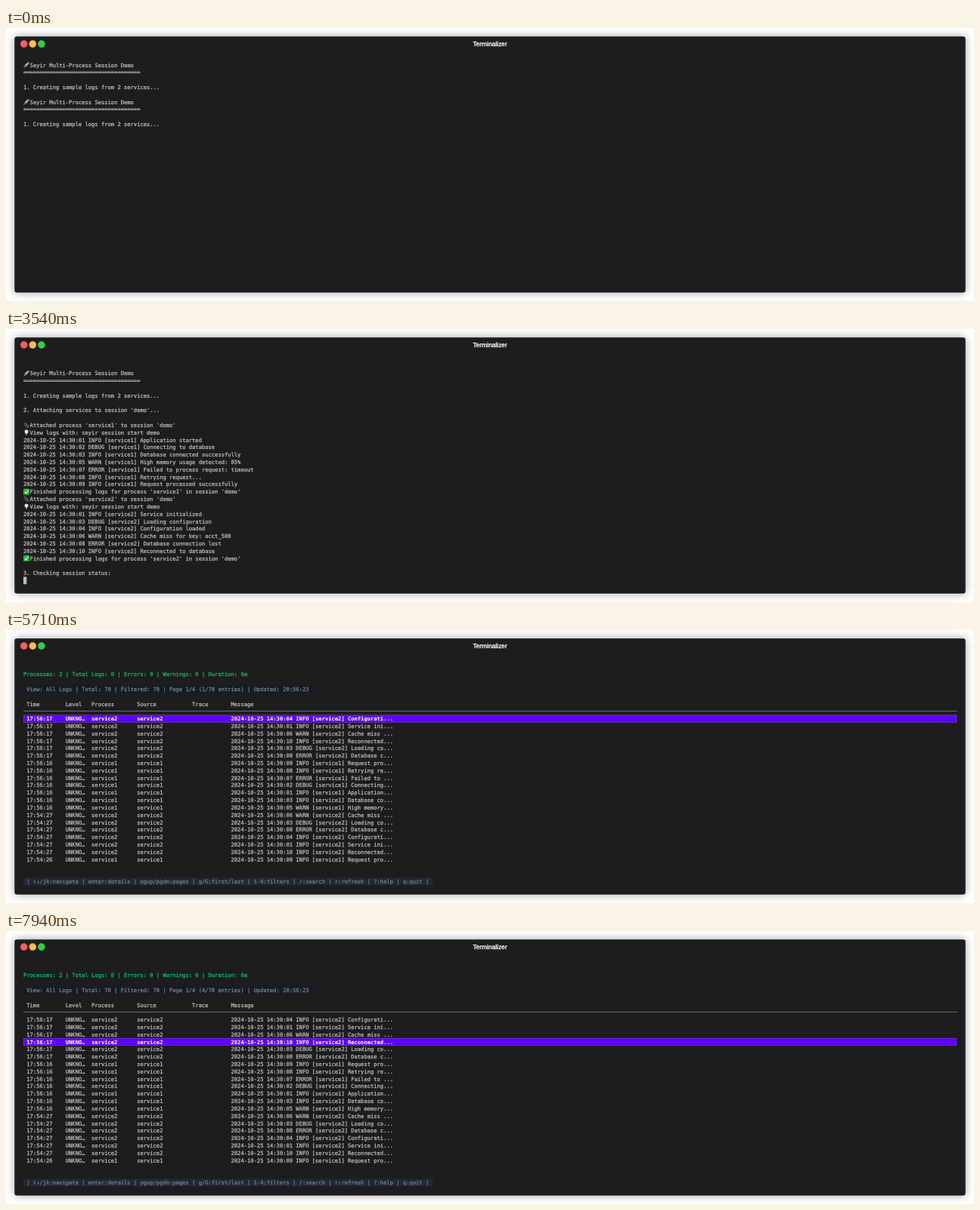
An HTML page with a canvas for the animation above (8 s loop, 1280x362 px).

```html
<!DOCTYPE html>
<html lang="en">
<head>
<meta charset="utf-8">
<title>Terminal session</title>
<style>
  html, body { margin: 0; width: 100%; height: 100%; overflow: hidden; background: #fff; }
  canvas { display: block; }
</style>
</head>
<body>
<canvas id="stage" width="1280" height="362"></canvas>
<script>
const ctx = document.getElementById('stage').getContext('2d');
const LOOP = 8000, ROWS = 30, COLS = 287;
const LEFT = 23, TOP = 44.1, CELL = 4.3, LINE = 9.81;
const BG = '#1d1d1d', FG = '#bcbcbc';
const MONO = '7.145px "DejaVu Sans Mono", monospace';

const stamp = (service, entries) => entries.map(entry =>
  `2024-10-25 14:30:${entry.replace(/^(\d+ \w+)/, `$1 [${service}]`)}`);

const logs = {
  service1: stamp('service1', [
    '01 INFO Application started',
    '02 DEBUG Connecting to database',
    '03 INFO Database connected successfully',
    '05 WARN High memory usage detected: 85%',
    '07 ERROR Failed to process request: timeout',
    '08 INFO Retrying request...',
    '09 INFO Request processed successfully',
  ]),
  service2: stamp('service2', [
    '01 INFO Service initialized',
    '03 DEBUG Loading configuration',
    '04 INFO Configuration loaded',
    '06 WARN Cache miss for key: acct_508',
    '08 ERROR Database connection lost',
    '10 INFO Reconnected to database',
  ]),
};

// Places each text at its column.
const columns = (stops, texts) =>
  texts.reduce((line, text, i) => line.padEnd(stops[i]) + text, '');

const intro = ['🚀Seyir Multi-Process Session Demo', '='.repeat(36), '',
  '1. Creating sample logs from 2 services...', ''];

const attach = name => [
  `📎Attached process '${name}' to session 'demo'`,
  '💡View logs with: seyir session start demo',
  ...logs[name],
  `✅Finished processing logs for process '${name}' in session 'demo'`,
];

const session = (...cells) => columns([0, 21, 34, 45, 54, 65], cells);

const transcript = [
  ...intro, ...intro,
  "2. Attaching services to session 'demo'...", '',
  ...attach('service1'), ...attach('service2'),
  '',
  '3. Checking session status:',
  'Active Sessions (4):',
  '',
  columns([0, 21, 34, 45, 55, 66], ['NAME', 'ID', 'DURATION', 'PROCESSES', 'LOGS', 'LAST UPDATE']),
  '-'.repeat(80),
  session('ecommerce-app', 'sess_059...', '12m', '3', '0', '20:46:30'),
  session('test-session', 'sess_26b...', '28m', '2', '0', '20:34:43'),
  session('demo', 'sess_912...', '6m', '2', '0', '20:54:34'),
  session('carbmee', 'sess_e91...', '59m', '1', '0', '20:23:34'),
  '',
  "Use 'seyir session start <name>' to view a session's logs in TUI.",
  '',
  '4. Opening TUI to view aggregated logs...',
  '',
  'Press any key to continue...',
];

const TABLE = [1, 13, 21, 35, 52, 64];
const batch = (time, name, order) => order.map(i => columns(TABLE,
  [time, 'UNKNO…', name, name, '', logs[name][i].slice(0, 47) + '...']));
const entries = [
  ...batch('17:56:17', 'service2', [2, 0, 3, 5, 1, 4]),
  ...batch('17:56:16', 'service1', [6, 5, 4, 1, 0, 2, 3]),
  ...batch('17:54:27', 'service2', [3, 1, 4, 2, 0, 5]),
  ...batch('17:54:26', 'service1', [6]),
];
const heading = columns(TABLE, ['Time', 'Level', 'Process', 'Source', 'Trace', 'Message']);
const keys = ' | ↑↓/jk:navigate | enter:details | pgup/pgdn:pages | g/G:first/last' +
  ' | 1-4:filters | /:search | r:refresh | ?:help | q:quit | ';

const shape = (path, fill, stroke, width = 1) => {
  const p = new Path2D(path);
  if (fill) { ctx.fillStyle = fill; ctx.fill(p); }
  if (stroke) { ctx.strokeStyle = stroke; ctx.lineWidth = width; ctx.stroke(p); }
};

// Icons fill an 8 by 8 box.
const icons = {
  '🚀': () => {
    shape('M.3 7.7L1.2 5.3 2.7 6.8Z', '#e8963a');
    shape('M.8 4.3L3 2.8 5.2 5 3.8 7.2 3 5.3Z', '#b5412f');
    shape('M2 5Q3.5 1 7.7.3Q7 4.5 3 6Z', '#a9adb0');
    shape('M6 .9L7.7.3 7.1 2Z', '#c4513f');
  },
  '📎': () => shape('M2.5 2.2L5.8 5.7Q6.7 7 5.6 7.4Q5 7.5 4.4 6.8L1.2 3.2Q.4 1.7 1.6 1Q2.6.6 3.5 1.6L7 5.4',
    null, '#9a9ea2', .7),
  '💡': () => {
    shape('M4 .3A2.5 2.5 0 0 1 5.2 5L5 5.8H3L2.8 5A2.5 2.5 0 0 1 4 .3Z', '#f6eeb4');
    shape('M3 6H5V7.2L4 7.8 3 7.2Z', '#8d9094');
  },
  '✅': () => {
    shape('M.9 0H7.1Q8 0 8 .9V7.1Q8 8 7.1 8H.9Q0 8 0 7.1V.9Q0 0 .9 0Z', '#22b52f');
    shape('M1.8 4.3L3.4 6.1 6.3 1.8', null, '#fff', 1.1);
  },
};

const rowTop = row => TOP + row * LINE;

// A hairline outline gives small text a fuller weight.
function print(text, x, y, color, outline) {
  ctx.fillStyle = ctx.strokeStyle = color;
  ctx.lineWidth = outline;
  ctx.fillText(text, x, y);
  ctx.strokeText(text, x, y);
}

function write(row, text, color = FG, weight = '') {
  const [first] = text;
  let x = LEFT;
  if (icons[first]) {
    ctx.save();
    ctx.translate(LEFT, rowTop(row) + .9);
    icons[first]();
    ctx.restore();
    text = text.slice(first.length);
    x += 2 * CELL;
  }
  ctx.font = `${weight} ${MONO}`;
  print(text, x, rowTop(row) + 7.4, color, weight ? .05 : .25);
}

function fillCells(row, count, color) {
  ctx.fillStyle = color;
  ctx.fillRect(LEFT, rowTop(row), count * CELL, LINE);
}

function drawWindow() {
  ctx.fillStyle = '#fff';
  ctx.fillRect(0, 0, 1280, 362);
  ctx.save();
  ctx.shadowColor = 'rgba(0, 0, 0, .38)';
  ctx.shadowBlur = 11.5;
  ctx.fillStyle = BG;
  ctx.beginPath();
  ctx.roundRect(11.3, 11.3, 1257.4, 339.4, 3);
  ctx.fill();
  ctx.restore();
  ['#fc5c58', '#ffbb4b', '#35cc4b'].forEach((color, i) => {
    ctx.fillStyle = color;
    ctx.beginPath();
    ctx.arc(23.7 + i * 11.6, 21.1, 4.8, 0, 2 * Math.PI);
    ctx.fill();
  });
  ctx.font = '8.4px "Liberation Sans", Arial, sans-serif';
  ctx.textAlign = 'center';
  print('Terminalizer', 640, 24.2, '#fff', .35);
  ctx.textAlign = 'left';
}

function drawShell(count, cursor = true) {
  const start = Math.max(0, count + 1 - ROWS);
  transcript.slice(start, count).forEach((line, row) => write(row, line));
  if (cursor) fillCells(count - start, 1, '#bcbcbc');
}

function drawViewer(selected) {
  write(1, 'Processes: 2 | Total Logs: 0 | Errors: 0 | Warnings: 0 | Duration: 6m', '#0dbd7e');
  const status = ` View: All Logs | Total: 78 | Filtered: 78 | Page 1/4 (${selected + 1}/78 entries) | Updated: 20:56:23 `;
  fillCells(3, status.length, '#151b28');
  write(3, status, '#7d828c');
  write(5, heading);
  ctx.fillStyle = '#6c6c6c';
  ctx.fillRect(LEFT, 107, COLS * CELL, 1);
  entries.forEach((entry, i) => {
    const row = 7 + i, active = i === selected;
    if (active) {
      fillCells(row, COLS, '#5f00ff');
      ctx.strokeStyle = '#8468b8';
      ctx.lineWidth = .4;
      ctx.strokeRect(LEFT + .2, rowTop(row) + .2, COLS * CELL - .4, LINE - .4);
    }
    write(row, entry, active ? '#ffffd0' : FG, active ? 'bold' : '');
  });
  fillCells(29, keys.length, '#1f2937');
  write(29, keys, '#777c85');
}

const scenes = [
  [0, () => drawShell(9, false)],
  [500, () => drawShell(12)],
  [630, () => drawShell(14)],
  [690, () => drawShell(22)],
  [1570, () => drawShell(24)],
  [1680, () => drawShell(31)],
  [3540, () => drawShell(33)],
  [3590, () => drawShell(47)],
  [5610, () => {}],
  [5630, () => drawViewer(0)],
  [7310, () => drawViewer(1)],
  [7740, () => drawViewer(2)],
  [7940, () => drawViewer(3)],
];

ctx.textRendering = 'geometricPrecision';
const began = performance.now();
let shown;

function tick() {
  const time = (performance.now() - began) % LOOP;
  const scene = scenes.findLast(([start]) => start <= time);
  if (scene !== shown) {
    shown = scene;
    drawWindow();
    scene[1]();
  }
  requestAnimationFrame(tick);
}
tick();
</script>
</body>
</html>
```
